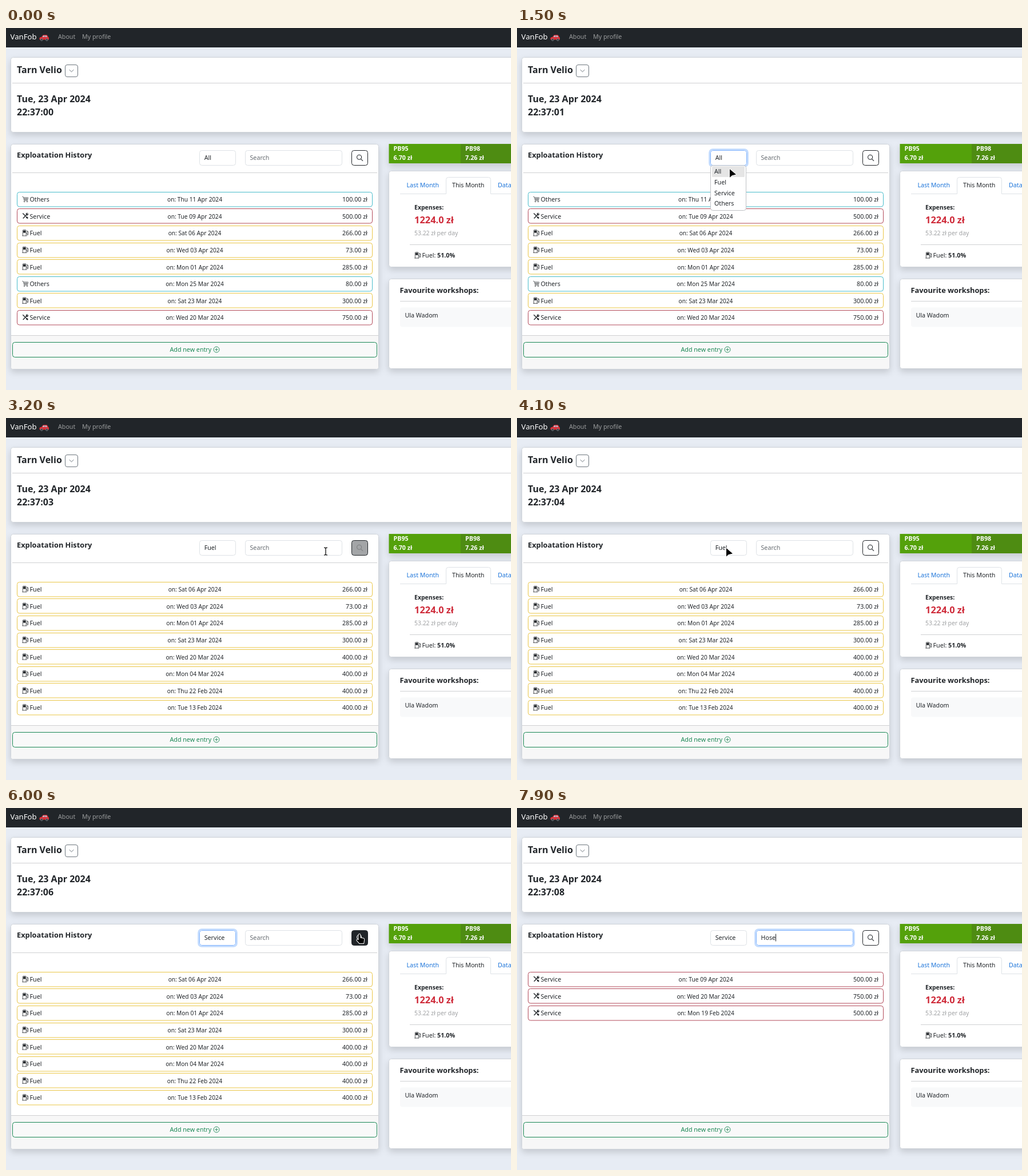
Write an HTML page that moves like this. It is 883x634 px and loops after 8 s.

```html
<!DOCTYPE html>
<html lang="en">
<head>
<meta charset="utf-8">
<title>Vehicle expenses</title>
<style>
html, body { margin: 0; width: 100%; height: 100%; overflow: hidden; background: #e7ecf4; }
svg { display: block; }
text { font: 10.7px "Noto Sans", "Open Sans", sans-serif; fill: #212529; white-space: pre; }
.b { font-weight: 600; }
.h5 { font-size: 12.8px; font-weight: 600; }
.h4 { font-size: 16px; font-weight: 600; }
.mid { text-anchor: middle; font-size: 10.2px; }
.end { text-anchor: end; }
.link { fill: #1a73d9; }
.nav { fill: #9b9d9e; }
.white { fill: #fff; }
.shade { filter: drop-shadow(0 5.6px 5.6px rgba(0,0,0,.15)); }
.card { fill: #fff; stroke: #d0d4da; }
.line { stroke: #cfd0d2; fill: none; }
.field { fill: #fff; stroke: #dee2e6; }
.ring { fill: none; stroke: #c2dbfe; stroke-width: 2.8; }
.ring { display: none; }
.focus .ring { display: inline; }
.focus .field { stroke: #86b7fe; }
.row { fill: #fff; }
.Others { stroke: #48bccb; }
.Service { stroke: #b24a5a; }
.Fuel { stroke: #eac647; }
.pen { fill: none; stroke: #212529; }
.ptr { stroke: #fff; stroke-linejoin: round; paint-order: stroke; }
</style>
</head>
<body>
<svg width="883" height="634" viewBox="0 0 883 634">
  <defs>
    <g id="Fuel" class="pen" stroke-width="1.1">
      <path d="M1.5 15.4V2Q1.5 .7 2.8 .7H8.5Q9.8 .7 9.8 2V15.4M0 15.4H11.4M9.8 8.4H11Q12.3 8.4 12.3 9.8V12.4Q12.3 13.5 13.4 13.5T14.6 12.4V5L12.5 2.4M14.6 6H13V3"/>
      <path d="M3.2 2.6H8.1V7.2H3.2Z" fill="#212529"/>
    </g>
    <g id="Service" class="pen" stroke-width="2">
      <path d="M2 14L10.5 5.5M1.4 1.4L5 5L9 9"/>
      <path d="M10 10L14 14" stroke-width="3.6"/>
      <path d="M14.6 2.2L12.5 4.4L11 3L13.3 .8Q10.6 .2 9.7 2.5Q9 5.2 11 6.1Q13.6 6.8 14.9 4.6Z" stroke-width="1" fill="#212529"/>
    </g>
    <g id="Others" class="pen" stroke-width=".9">
      <path d="M0 2H2.4L5 11.4H13.2L14.8 4.2H3M4.2 7.7H14M6.6 4.2L7.4 11.4M10.9 4.2L10.3 11.4"/>
      <circle cx="5.5" cy="14" r="1.4"/><circle cx="12.4" cy="14" r="1.4"/>
    </g>
  </defs>

  <rect width="883" height="634" fill="#e7ecf4"/>
  <rect width="883" height="34" fill="#212529"/>
  <text class="white" x="7.5" y="19.5" style="font-size:13.2px">VanFob</text>
  <g>
    <path d="M58.5 19.8V17.4Q59 16 62 15.7L64.4 12.6Q65 12 66.5 12H70.3Q71.6 12 72.4 13L74 15.8Q75 16.3 75 17.5V19.8Q75 20.6 74 20.6H59.4Q58.5 20.6 58.5 19.8Z" fill="#dc3038"/>
    <path d="M63.6 15.7L65.3 13.3H67.5V15.7ZM68.5 15.7V13.3H70.6L72.3 15.7Z" fill="#a9cfdf"/>
    <g fill="#333b40" stroke="#8b979d" stroke-width=".7"><circle cx="62.3" cy="20.5" r="1.9"/><circle cx="71.4" cy="20.5" r="1.9"/></g>
  </g>
  <text class="nav" x="91" y="18.5">About</text>
  <text class="nav" x="133" y="18.5">My profile</text>

  <rect class="card shade" x="8.5" y="51.5" width="920" height="131" rx="4"/>
  <text class="h4" x="19" y="78.5">Tarn Velio</text>
  <rect x="103.5" y="64.5" width="22" height="21" rx="3.5" fill="#fff" stroke="#6c757d"/>
  <path class="pen" d="M110.6 73L114.5 76.8L118.4 73" style="stroke:#6c757d"/>
  <path class="line" d="M11 96.5H883"/>
  <text class="h4" x="19" y="129.5">Tue, 23 Apr 2024</text>
  <text class="h4" x="19" y="153" id="clock">22:37:00</text>

  <rect class="card shade" x="8.5" y="203.5" width="643" height="394" rx="4"/>
  <path d="M9 538H651V593.5Q651 597 647.5 597H12.5Q9 597 9 593.5Z" fill="#f7f7f7"/>
  <path class="line" d="M9 538.5H651M11 253.5H649"/>
  <text class="h5" x="19" y="227.3">Exploatation History</text>
  <g id="select">
    <rect class="ring" x="336.6" y="212.6" width="66.8" height="29.8" rx="5.5"/>
    <rect class="field" x="338.5" y="214.5" width="63" height="26" rx="4"/>
    <text x="346.7" y="231" id="choice">All</text>
  </g>
  <g id="search">
    <rect class="ring" x="416.6" y="212.6" width="172.8" height="29.8" rx="5.5"/>
    <rect class="field" x="418.5" y="214.5" width="169" height="26" rx="4"/>
    <text x="426.5" y="231" id="hint" style="fill:#666b70">Search</text>
    <text x="426.5" y="231" id="typed"></text>
    <rect id="caret" y="220.5" width="1" height="13" fill="#212529"/>
  </g>
  <rect id="btn" x="604.5" y="214.5" width="28" height="26" rx="4" stroke="#212529"/>
  <path id="lens" d="M620.8 229.6L624 232.8M621.6 226.2A4 4 0 1 1 613.6 226.2A4 4 0 1 1 621.6 226.2" fill="none" stroke-width="1.1"/>
  <g id="lists"></g>
  <rect x="11.5" y="550.5" width="637" height="26" rx="4" fill="#f9f9f9" stroke="#198754"/>
  <text x="286.5" y="567" style="fill:#198754">Add new entry</text>
  <path d="M373 563.2A5 5 0 1 1 363 563.2A5 5 0 1 1 373 563.2M368 560.5V566M365.2 563.2H370.8" fill="none" stroke="#198754" stroke-width=".9"/>

  <rect class="shade" x="669.5" y="203" width="260" height="34" fill="#54a10b"/>
  <rect x="795" y="203" width="100" height="34" fill="#4e8c12"/>
  <text class="b white" x="677.5" y="215">PB95</text>
  <text class="b white" x="677.5" y="231">6.70 zł</text>
  <text class="b white" x="803" y="215">PB98</text>
  <text class="b white" x="803" y="231">7.26 zł</text>

  <rect class="card shade" x="669.5" y="250.5" width="260" height="168" rx="4"/>
  <path class="line" d="M689 290.5H769.5V265.5Q769.5 261.5 773.5 261.5H843.5Q847.5 261.5 847.5 265.5V290.5H883" style="stroke:#dee2e6"/>
  <text class="link" x="700.5" y="279">Last Month</text>
  <text x="780" y="279">This Month</text>
  <text class="link" x="860" y="279">Data</text>
  <text class="b" x="714" y="317.5" style="font-size:10.5px">Expenses:</text>
  <text class="h4" x="714" y="341.5" style="font-size:16.4px;font-weight:700;fill:#cf2c3b">1224.0 zł</text>
  <text x="714" y="363" style="font-size:10.4px;font-weight:300;fill:#a0a2a4">53.22 zł per day</text>
  <path class="line" d="M706 379.5H883"/>
  <use href="#Fuel" transform="translate(714.3 392.3) scale(.7)"/>
  <text x="727.5" y="402.3">Fuel: <tspan font-weight="700">51.0%</tspan></text>

  <rect class="card shade" x="669.5" y="439.5" width="260" height="157" rx="4"/>
  <text class="h5" x="688.5" y="464.3">Favourite workshops:</text>
  <path class="line" d="M689 478.5H883"/>
  <rect x="689" y="489.5" width="200" height="34" rx="4" fill="#f8f9fa"/>
  <text x="697.5" y="507">Ula Wadom</text>

  <g id="menu">
    <rect x="338.5" y="240.8" width="62" height="78.7" rx="4" fill="#fff" stroke="#bfc1c4"/>
    <rect id="mark" x="341" width="57" height="18.6" rx="1.5" fill="#e5e5e5"/>
    <g id="items"></g>
  </g>

  <g id="pointer">
    <path id="arrow" class="ptr" d="M0 0V14.5L4 11L11 9.4Z" stroke-width="1.6"/>
    <path id="beam" d="M-2.8 -6.5Q0 -6.5 0 -5V5Q0 6.5 -2.8 6.5M2.8 -6.5Q0 -6.5 0 -5V5Q0 6.5 2.8 6.5" fill="none" stroke="#111" stroke-width="1.3"/>
    <path id="hand" class="ptr" d="M-1.4 1Q-1.4 -.4 0 -.4T1.4 1V6L7 7Q8.4 7.5 8.2 9.3L7.2 15.5H.2L-4.4 10.6Q-5 9.4 -3.8 8.8L-1.4 9.8Z" stroke-width="2"/>
  </g>
</svg>
<script>
const LOOP = 8000;
const OPTIONS = ['All', 'Fuel', 'Service', 'Others'];
const LISTS = {
  All: `Others,Thu 11 Apr,100|Service,Tue 09 Apr,500|Fuel,Sat 06 Apr,266|Fuel,Wed 03 Apr,73|
Fuel,Mon 01 Apr,285|Others,Mon 25 Mar,80|Fuel,Sat 23 Mar,300|Service,Wed 20 Mar,750`,
  Fuel: `Fuel,Sat 06 Apr,266|Fuel,Wed 03 Apr,73|Fuel,Mon 01 Apr,285|Fuel,Sat 23 Mar,300|
Fuel,Wed 20 Mar,400|Fuel,Mon 04 Mar,400|Fuel,Thu 22 Feb,400|Fuel,Tue 13 Feb,400`,
  Service: 'Service,Tue 09 Apr,500|Service,Wed 20 Mar,750|Service,Mon 19 Feb,500'
};
// Pointer stops: time, x, y
const PATH = [
  [350, 900, 420], [800, 371, 226], [1300, 371, 226], [1700, 373, 268], [1950, 373, 268],
  [2200, 381, 264], [2300, 381, 264], [2750, 618, 226], [3050, 618, 226], [3200, 559, 233.5],
  [3400, 559, 233.5], [4100, 366, 228], [4500, 366, 228], [4900, 366, 277], [5200, 370, 288],
  [5450, 370, 288], [5950, 618, 221.5], [6450, 618, 221.5], [6900, 500, 230]
];
const ITEM_TOP = 242.3, ITEM_H = 18.6;
const $ = id => document.getElementById(id);
const show = (el, on) => { el.style.display = on ? 'inline' : 'none'; };
const within = (t, a, b) => t >= a && t < b;
const ramp = (t, a, b) => Math.min(1, Math.max(0, (t - a) / (b - a)));

function rowMarkup(entry, i) {
  const [kind, day, sum] = entry.trim().split(',');
  const y = 287.3 + i * 29.6;
  return `<rect class="row ${kind}" x="19.5" y="${Math.floor(y) + .5}" width="621" height="25.5" rx="4"/>
    <use href="#${kind}" transform="translate(28.3 ${y + 6.7}) scale(.7)"/>
    <text x="41.5" y="${y + 16.8}">${kind}</text>
    <text class="mid" x="330" y="${y + 16.8}">on: ${day} 2024</text>
    <text class="end" x="632" y="${y + 16.8}">${sum}.00 zł</text>`;
}

$('lists').innerHTML = Object.entries(LISTS).map(([name, rows]) =>
  `<g id="list${name}">${rows.split('|').map(rowMarkup).join('')}</g>`).join('');
$('items').innerHTML = OPTIONS.map((name, i) =>
  `<text x="345" y="${255.4 + i * ITEM_H}">${name}</text>`).join('');

function pointerAt(t) {
  const next = PATH.findIndex(p => p[0] > t);
  if (next < 1) return (next ? PATH[PATH.length - 1] : PATH[0]).slice(1);
  const [t0, x0, y0] = PATH[next - 1], [t1, x1, y1] = PATH[next];
  const u = ramp(t, t0, t1), s = u * u * (3 - 2 * u);
  return [x0 + (x1 - x0) * s, y0 + (y1 - y0) * s];
}

function drawPointer(t, x, y, menuOpen) {
  const inBar = !menuOpen && y > 214 && y < 241;
  const hand = inBar && x > 604 && x < 633;
  const beam = inBar && x > 418 && x < 588;
  show($('pointer'), t < 7300);
  show($('hand'), hand);
  show($('beam'), beam);
  show($('arrow'), !hand && !beam);
  $('pointer').setAttribute('transform', `translate(${x} ${y})`);
}

function drawButton(t) {
  const hover = ramp(t, 2685, 2835) - ramp(t, 3110, 3265) + ramp(t, 5850, 5980) - ramp(t, 6540, 6690);
  const mix = (a, b) => a.map((v, i) => Math.round(v + (b[i] - v) * hover));
  const dark = [33, 37, 41], light = [255, 255, 255];
  $('btn').style.fill = `rgb(${mix(light, dark)})`;
  $('lens').style.stroke = `rgb(${mix(dark, light)})`;
}

function drawMenu(open, y, chosen) {
  show($('menu'), open);
  const hovered = Math.floor((y - ITEM_TOP) / ITEM_H);
  const row = hovered >= 0 && hovered < 4 ? hovered : OPTIONS.indexOf(chosen);
  $('mark').setAttribute('y', ITEM_TOP + row * ITEM_H);
}

function draw(t) {
  const [x, y] = pointerAt(t);
  const menuOpen = within(t, 1100, 1950) || within(t, 4500, 5300);
  const chosen = t < 1950 ? 'All' : t < 5300 ? 'Fuel' : 'Service';
  const listed = t < 3000 ? 'All' : t < 6250 ? 'Fuel' : 'Service';
  const typing = t >= 7000;
  const typed = 'Hose'.slice(0, Math.max(0, Math.floor((t - 7200) / 150)));

  $('clock').textContent = '22:37:0' + Math.floor((t + 400) / 1000);
  $('choice').textContent = chosen;
  $('select').classList.toggle('focus', within(t, 1100, 2900) || within(t, 4500, 6150));
  $('search').classList.toggle('focus', typing);
  show($('hint'), !typed);
  $('typed').textContent = typed;
  show($('caret'), typing);
  $('caret').setAttribute('x', 426.5 + (typed ? $('typed').getComputedTextLength() : 0));
  for (const name in LISTS) show($('list' + name), name === listed);
  drawMenu(menuOpen, y, chosen);
  drawButton(t);
  drawPointer(t, x, y, menuOpen);
}

const start = performance.now();
function tick() {
  draw((performance.now() - start) % LOOP);
  requestAnimationFrame(tick);
}
tick();
</script>
</body>
</html>
```
